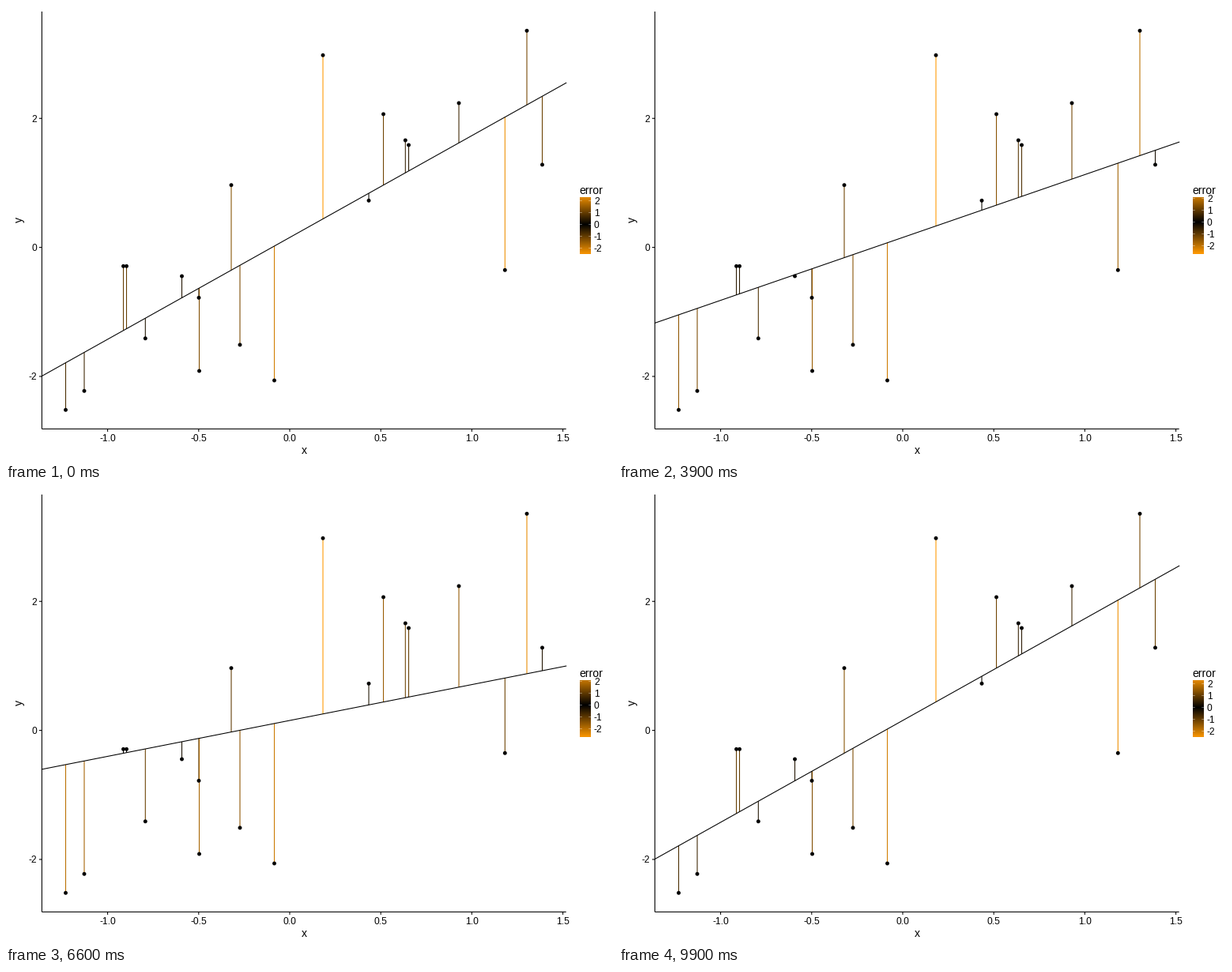
These frames come from a looping animation (768x576 px, 10000 ms). A matplotlib script:

```python
import numpy as np
import matplotlib.pyplot as plt
from matplotlib.animation import FuncAnimation
from matplotlib.collections import LineCollection
from matplotlib.patches import Circle

plt.rcParams["font.family"] = "Liberation Sans"

W, H, DPI = 768, 576, 72  # at 72 dpi one point is one pixel
LEFT, RIGHT, TOP, BOTTOM = 45.4, 708.7, 7, 535.4
X0, Y0, X_UNIT, Y_UNIT = 359, 305.6, 230.4, 81.67
BAR_X, BAR_Y, BAR_W, BAR_H = 726, 242, 14, 72
BIN = 0.2
LINE_W = 1.07
ORANGE = np.array([255, 153, 0]) / 255

# The observations, as stage positions
points = np.array([
    (75.5, 511), (99, 487), (148.5, 329), (152.5, 329), (176.3, 420.5),
    (222.5, 341.7), (244, 369), (244.5, 461.7), (285, 226.4), (296, 428.6),
    (339.5, 473.7), (401, 62), (459, 246), (477.5, 136.6), (505.3, 169.7),
    (509.5, 175.7), (573, 122.6), (631.3, 334), (659, 31), (678.5, 200.6)])
px, py = (points + [0, 0.3]).T
x, y = (px - X0) / X_UNIT, (Y0 - py) / Y_UNIT

best_slope, intercept = np.polyfit(x, y, 1)
slopes = np.concatenate([np.linspace(best_slope, 0.2, 90),
                         np.linspace(0.2, best_slope, 10)])

fig = plt.figure(figsize=(W / DPI, H / DPI), dpi=DPI, facecolor="white")
stage = fig.add_axes([0, 0, 1, 1])
stage.axis("off")
bar = stage.imshow(np.zeros((BAR_H, 1, 3)), aspect="auto", interpolation="nearest",
                   extent=(BAR_X, BAR_X + BAR_W, BAR_Y + BAR_H, BAR_Y))
stage.set(xlim=(0, W), ylim=(H, 0))


def lines(segments=(), width=LINE_W, color="black", zorder=1):
    group = LineCollection(segments, colors=color, linewidths=width,
                           zorder=zorder, snap=False)
    stage.add_collection(group, autolim=False)
    return group


def label(left, base, text, size=12, ha="left", **style):
    return stage.text(left, base, text, fontsize=size, ha=ha,
                      **{"va": "baseline", **style})


def line_y(slope, at):
    """Stage height of the fitted line at stage position `at`."""
    return Y0 - Y_UNIT * (intercept + slope * (at - X0) / X_UNIT)


axis_lines = [[(LEFT, TOP), (LEFT, BOTTOM)], [(LEFT, BOTTOM), (RIGHT, BOTTOM)]]
for v in np.arange(-1, 2, 0.5):
    at = X0 + v * X_UNIT
    axis_lines.append([(at, BOTTOM), (at, BOTTOM + 3.5)])
    label(at, 551.2, f"{v:.1f}", ha="center")
for v in (-2, 0, 2):
    at = Y0 - v * Y_UNIT
    axis_lines.append([(LEFT - 3.5, at), (LEFT, at)])
    label(39, at + 4.3, str(v), ha="right")
lines(axis_lines)

label((LEFT + RIGHT) / 2, 567, "x", 14, "center")
label(17, 271, "y", 14, "center", va="center", rotation=90)
label(725.8, 238, "error", 14)

breaks = {v: label(744, 0, str(v)) for v in range(-2, 3)}
bar_ticks = lines(width=0.375, color="white", zorder=2)
residuals = lines()
fit_line, = stage.plot([], [], color="black", lw=LINE_W, zorder=2)
for center in zip(px, py):
    stage.add_patch(Circle(center, 2.45, color="black", lw=0, zorder=3))


def error_colors(error, largest):
    return np.abs(error)[:, None] / largest * ORANGE


def update(frame):
    slope = slopes[frame]
    fitted = line_y(slope, px)
    error = (py - fitted) / Y_UNIT
    largest = np.abs(error).max()

    ends = np.array([LEFT, RIGHT])
    fit_line.set_data(ends, line_y(slope, ends))
    residuals.set_segments([[(a, b), (a, c)] for a, b, c in zip(px, py, fitted)])
    residuals.set_color(error_colors(error, largest))

    # The bar shows only whole bins that lie inside the error range
    low, high = np.ceil(error.min() / BIN), np.floor(error.max() / BIN)
    bins = high - low + 1
    rows = (np.arange(BAR_H) + 0.5) / BAR_H * bins
    values = BIN * np.clip(high + 0.5 - rows, low, high)
    bar.set_data(error_colors(values, largest)[:, None, :])

    marks = []
    for v, text in breaks.items():
        at = BAR_Y + (high - v / BIN + 0.5) * BAR_H / bins
        text.set_y(at + 4.5)
        for left in (BAR_X, BAR_X + 0.8 * BAR_W):
            marks.append([(left, at), (left + BAR_W / 5, at)])
    bar_ticks.set_segments(marks)
    return [fit_line, residuals, bar, bar_ticks, *breaks.values()]


animation = FuncAnimation(fig, update, frames=len(slopes), interval=100,
                          repeat=True, repeat_delay=0, blit=False)
plt.show()
```
